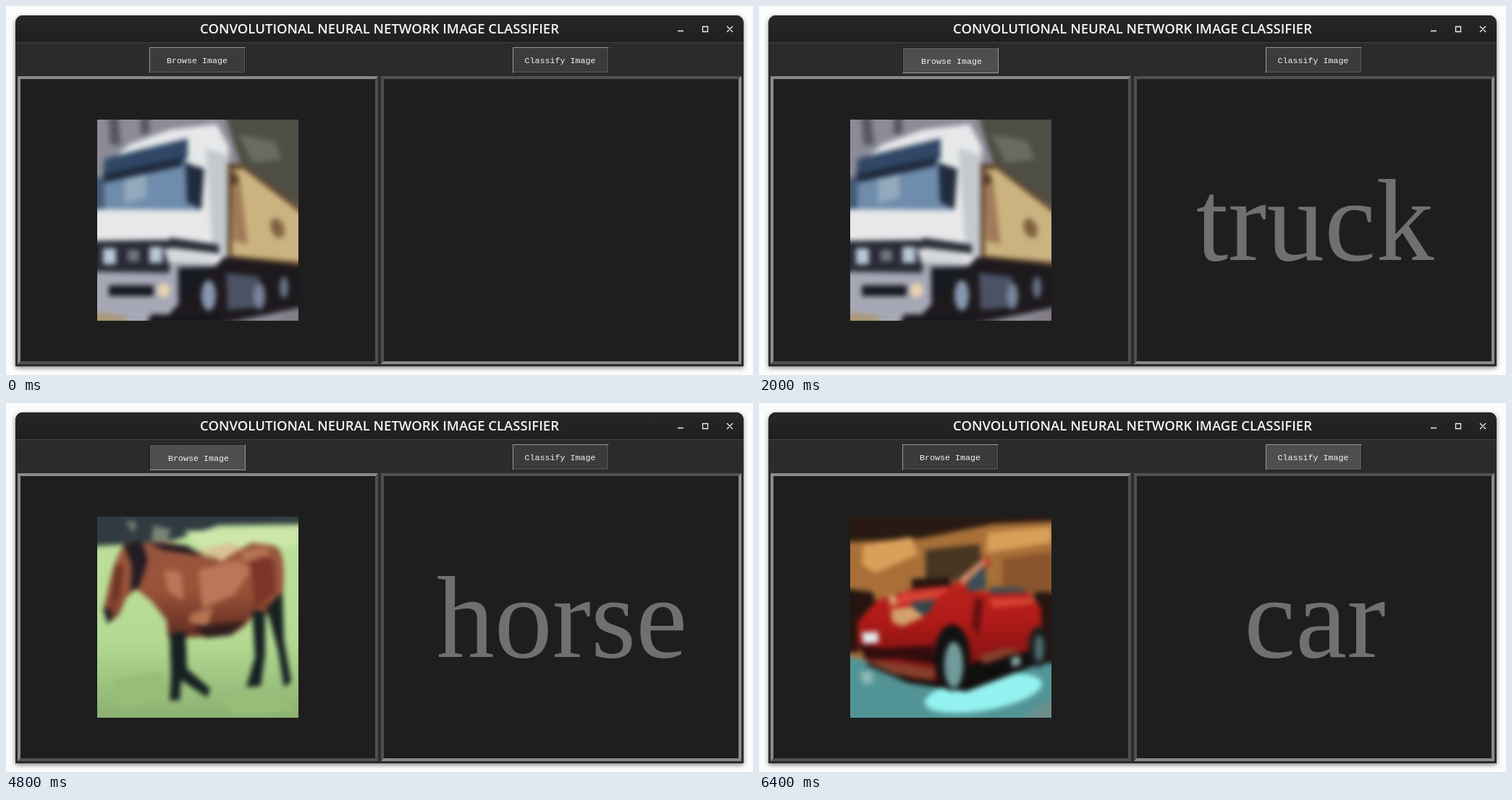
An HTML page that plays this animation: 1032x510 px, repeating every 6.8 s.

```html
<!DOCTYPE html>
<html lang="en">
<head>
<meta charset="utf-8">
<title>Image classifier</title>
<style>
html, body { margin: 0; width: 100%; height: 100%; overflow: hidden; background: #fcfcfc; }
div, svg { position: absolute; box-sizing: border-box; }
#window { left: 13px; top: 13px; width: 1006px; height: 485px; border-radius: 10px 10px 0 0;
  background: #2b2b2b; box-shadow: 0 2px 6px rgba(0,0,0,.5); overflow: hidden; }
#bar { width: 100%; height: 38px; background: linear-gradient(#272727, #1f1f1f);
  border-bottom: 1px solid #414141; }
.panel { top: 97px; width: 498px; height: 398px; border: 4px solid; background: #1e1e1e; }
#left { left: 16px; border-color: #8a8a8a #505050 #505050 #8a8a8a; }
#right { left: 518px; border-color: #505050 #8a8a8a #8a8a8a #505050; }
.button { top: 57px; width: 133px; height: 36px; background: #3b3b3b; border: 1px solid;
  border-color: #999 #1c1c1c #1c1c1c #999; box-shadow: inset -1px -1px #5c5c5c; }
.hover, .press { background: #4e4e4e; }
.press { border-color: #1c1c1c #999 #999 #1c1c1c; box-shadow: inset 1px 1px #5c5c5c; }
#browse { left: 198px; }
#classify { left: 700px; }
svg { left: 0; top: 0; }
text { text-anchor: middle; }
.caption { font: 11.67px "Liberation Mono", monospace; fill: #f2f2f2; }
#title { font: 600 18.4px "Open Sans", "Noto Sans", sans-serif; fill: #f4f4f4; }
#label { font: 160px "Liberation Serif", serif; fill: #707070; }
</style>
</head>
<body>
<div id="window"><div id="bar"></div></div>
<div class="panel" id="left"></div>
<div class="panel" id="right"></div>
<div id="browse"></div>
<div id="classify"></div>

<svg width="1032" height="510">
  <defs>
    <clipPath id="square"><path d="M0 0H278V278H0Z"/></clipPath>
    <filter id="soft" filterUnits="userSpaceOnUse" x="-20" y="-20" width="318" height="318"
      color-interpolation-filters="sRGB"><feGaussianBlur stdDeviation="3.6"/></filter>
    <linearGradient id="meadow" x2="0" y2="1">
      <stop stop-color="#bfe29d"/><stop offset=".6" stop-color="#b4da92"/><stop offset="1" stop-color="#83a86b"/>
    </linearGradient>
    <linearGradient id="paint" x2="0" y2="1">
      <stop stop-color="#c2281f"/><stop offset=".5" stop-color="#b01a18"/><stop offset="1" stop-color="#6d0d0e"/>
    </linearGradient>
    <linearGradient id="coat" x2="0" y2="1">
      <stop stop-color="#97563d"/><stop offset=".5" stop-color="#9a5239"/><stop offset="1" stop-color="#602b20"/>
    </linearGradient>
  </defs>

  <text id="title" x="516" y="38">CONVOLUTIONAL NEURAL NETWORK IMAGE CLASSIFIER</text>
  <path d="M928 34.5h8M962.5 28.5h7v7h-7zM996 28l8 8m0-8l-8 8" fill="none" stroke="#f0f0f0" stroke-width="1.3"/>
  <text class="caption" id="browseText" x="264" y="79">Browse Image</text>
  <text class="caption" id="classifyText" x="765.5" y="79">Classify Image</text>
  <text id="label" x="768" y="351"></text>

  <g transform="translate(126 157)" clip-path="url(#square)">
    <g class="photo" id="truck" filter="url(#soft)">
      <path fill="#8c8c98" d="M-20-20H298V298H-20z"/>
      <path fill="#4e4e44" d="M172-20H298V130L200 68z"/>
      <path fill="#6b6b5f" d="M195 20l50 10 10 25-40 5z"/>
      <path fill="#55565f" d="M15-20h12l6 55H18zM60-20h12v40H60z"/>
      <path fill="#e6e8e9" d="M12 62L45 34 100 14l65-8 17 32v162L-20 190v-60l28-8z"/>
      <path fill="#c3c9cf" d="M150 40l32 10v145l-22-10z"/>
      <path fill="#304866" d="M10 54L58 42l67-16v28L60 70 8 84z"/>
      <path fill="#6e8cab" d="M6 80l114-25 24 18v52L8 124z"/>
      <path fill="#93a9bd" d="M38 78l30-8v38l-30 8z"/>
      <path fill="#202b3d" d="M122 60l26 8-4 56-20-10zM8 76l50-12 62-12-2 12-64 14-48 10z"/>
      <path fill="#445a75" d="M-20 80h30v44h-30z"/>
      <path fill="#a6a8b5" d="M-20 200H110v98H-20z"/>
      <path fill="#282a35" d="M-20 168l120-2v46l-120-2zM100 163l68 10v12l-68-8z"/>
      <path fill="#d5d8dc" d="M92 178l60 8 16 16-70-4z"/>
      <path fill="#b9c9d6" d="M8 178h18v22H8zM72 176h18v22H72z"/>
      <path fill="#747581" d="M42 180h16v16H42z"/>
      <path fill="#181a22" d="M16 229h62v15H16zM112 205l55-2 14 30-8 45h-60z"/>
      <ellipse fill="#ead3b1" cx="92" cy="236" rx="9" ry="10"/>
      <path fill="#60462f" d="M180 60l22 2 96 72v72H180z"/>
      <path fill="#cbb380" d="M186 70l16-2 96 74v56l-112-10z"/>
      <path fill="#a17b57" d="M185 76l12 4 11 92-20-4z"/>
      <ellipse fill="#5b402c" cx="189" cy="82" rx="6" ry="9"/>
      <ellipse fill="#80613f" cx="249" cy="150" rx="9" ry="14" transform="rotate(-20 249 150)"/>
      <path fill="#1d191d" d="M175 190l123 14v52L100 298V268z"/>
      <path fill="#4c5265" d="M178 212l46 5v42l-44 4z"/>
      <ellipse fill="#8797b1" cx="154" cy="243" rx="10" ry="21"/>
      <ellipse fill="#78859c" cx="224" cy="244" rx="8" ry="18"/>
      <ellipse fill="#677189" cx="258" cy="232" rx="6" ry="15"/>
      <path fill="#827d82" d="M298 250v48h-88z"/>
      <path fill="#aa9777" d="M-20 264l60 8v26h-60z"/>
      <path fill="#17171b" d="M75 269l95 2v27H60z"/>
    </g>

    <g class="photo" id="horse" filter="url(#soft)">
      <path fill="url(#meadow)" d="M-20-20H298V298H-20z"/>
      <path fill="#303b41" d="M-20-20H298V10l-130 2-60 20-68 6-60 4z"/>
      <path fill="#788579" d="M78 12l24 6-6 16-22 2zM40 6l14 2-4 16z"/>
      <path fill="#cde7ab" d="M120 20l158-4v24l-130 6z"/>
      <path fill="#97bd77" d="M20 225l70-12 10 40-70 12zM160 245l90-5 20 30-80 5z"/>
      <path fill="url(#coat)" d="M38 36C20 65 16 98 8 130l8 16 14-10 10-24 14-12 22 18 20 26 2 24 50-2c36 2 58-10 68-32l26 2 14-26c4-38 2-66-12-70l-30-4c-20 10-38 26-64 18C120 36 92 32 62 36z"/>
      <path fill="#d8c394" d="M142 46l44-10 12 8-26 18z"/>
      <path fill="#b97658" d="M140 74l55-14 18 14-24 34-44 20zM92 74l24 2 4 40-22-12z"/>
      <path fill="#7b3426" d="M210 52l34 8 2 44-28 22z"/>
      <path fill="#b57553" d="M198 48l32-6 10 10-36 12zM130 134l30-8-8 26-26-6z"/>
      <path fill="#231c22" d="M36 38l26-4 8 26-12 38-12 6 2-36zM8 126l10 2 4 14-8 6zM70 36l54 4 20 14-54-8z"/>
      <path fill="#6f3326" d="M24 66l12 2-4 42-14 16z"/>
      <path fill="#301d1d" d="M134 152l70-8-18 20-36 4z"/>
      <path fill="#152021" d="M100 162l22-4 2 52 32 28-4 12-36-24-2 28h-14l2-34zM214 130l18 2v58l-6 44-20 2 12-42zM234 126l22-22 2 66 10 58-10 8-8-50z"/>
    </g>

    <g class="photo" id="car" filter="url(#soft)">
      <path fill="#a87038" d="M-20-20H298V298H-20z"/>
      <path fill="#281a12" d="M-20-20H298V6l-100 4-100 20-118 6z"/>
      <path fill="#daa05a" d="M18 40l66-12 10 24-60 26-18-12zM190 22l88-8v22l-90 14z"/>
      <path fill="#8a552e" d="M210 58l88-12v68l-88-4z"/>
      <path fill="#473521" d="M104 46l74-8 4 24-32 26H104z"/>
      <path fill="#25140f" d="M-20 98l50 6 10 24-30 60h-30zM85 86l50-2 10 16-60 8zM255 104l43 2v100h-43z"/>
      <path fill="#529495" d="M-20 190l60 12 100 16 158-18v98H-20z"/>
      <ellipse fill="#94f2f1" cx="184" cy="244" rx="82" ry="24" transform="rotate(-10 184 244)"/>
      <path fill="#6d8f8c" d="M298 242v56h-98z"/>
      <path fill="#110e0e" d="M20 204l60 26 80 12 116-44-10-26-130 8z"/>
      <path fill="url(#paint)" d="M10 146l26-30 55-17 50-4 44-39 9 5-20 42 72 2 17 20 2 36-20 26-74 14-32 28-50-4-58-22-21-24z"/>
      <path fill="#d84335" d="M70 106l70-8-26 18-54 6zM190 114l60-2 8 8-60 6z"/>
      <path fill="#394d54" d="M162 90l24-24 2 34-26 4zM192 97l46 1 4 7-48 1z"/>
      <path fill="#c88a68" d="M150 86l34-28 5 6-34 32z"/>
      <path fill="#641012" d="M172 112l12 2-6 50-10-10z"/>
      <path fill="#36454a" d="M84 118l34-4-8 18-20 8z"/>
      <path fill="#d4a06d" d="M56 128l28-4 18 14-30 14-14-6zM52 110l10-2 4 12-10 4z"/>
      <path fill="#320c0e" d="M10 176l36 6 68-4 4 26-52-8-44 2z"/>
      <path fill="#85402c" d="M18 198l34 2 66 10-4 16-54-8zM176 192l44-12 16 6-50 18z"/>
      <path fill="#e3e8ec" d="M16 160l22-1 2 15-22 2z"/>
      <path fill="#8eb9b8" d="M14 214h16l2 16-14 2z"/>
      <ellipse fill="#101112" cx="141" cy="195" rx="25" ry="46"/>
      <ellipse fill="#719a9b" cx="143" cy="205" rx="13" ry="32"/>
      <ellipse fill="#182020" cx="260" cy="180" rx="14" ry="28"/>
      <ellipse fill="#526e70" cx="261" cy="182" rx="6" ry="18"/>
      <path fill="#86aaa9" d="M222 196l12-4 2 12-12 4z"/>
    </g>
  </g>
</svg>

<script>
const LOOP = 6800;
// start time, photo, browse button, classify button, result
const steps = [
  [0, "truck", "", "", ""],
  [400, "truck", "", "hover", ""],
  [800, "truck", "", "press", ""],
  [1200, "truck", "", "hover", "truck"],
  [1600, "truck", "hover", "", "truck"],
  [2000, "truck", "press", "", "truck"],
  [2800, "horse", "", "", ""],
  [3200, "horse", "", "hover", ""],
  [3600, "horse", "", "press", ""],
  [4000, "horse", "", "hover", ""],
  [4400, "horse", "", "hover", "horse"],
  [4800, "horse", "press", "", "horse"],
  [5200, "car", "", "", ""],
  [5600, "car", "", "hover", ""],
  [6000, "car", "", "press", ""],
  [6400, "car", "", "hover", "car"]
];
const get = id => document.getElementById(id);
const photos = document.querySelectorAll(".photo");

function setButton(id, state) {
  get(id).className = "button " + state;
  get(id + "Text").setAttribute("transform", state === "press" ? "translate(2 1)" : "");
}

function show([, photo, browse, classify, result]) {
  for (const p of photos) p.style.display = p.id === photo ? "" : "none";
  setButton("browse", browse);
  setButton("classify", classify);
  get("label").textContent = result;
}

// Keep the heading 496px long whichever listed font is present
const title = get("title");
title.style.fontSize = 18.4 * 496 / title.getComputedTextLength() + "px";

let current;
function frame() {
  const t = performance.now() % LOOP;
  const step = steps.findLast(s => s[0] <= t);
  if (step !== current) show(current = step);
  requestAnimationFrame(frame);
}
frame();
</script>
</body>
</html>
```
